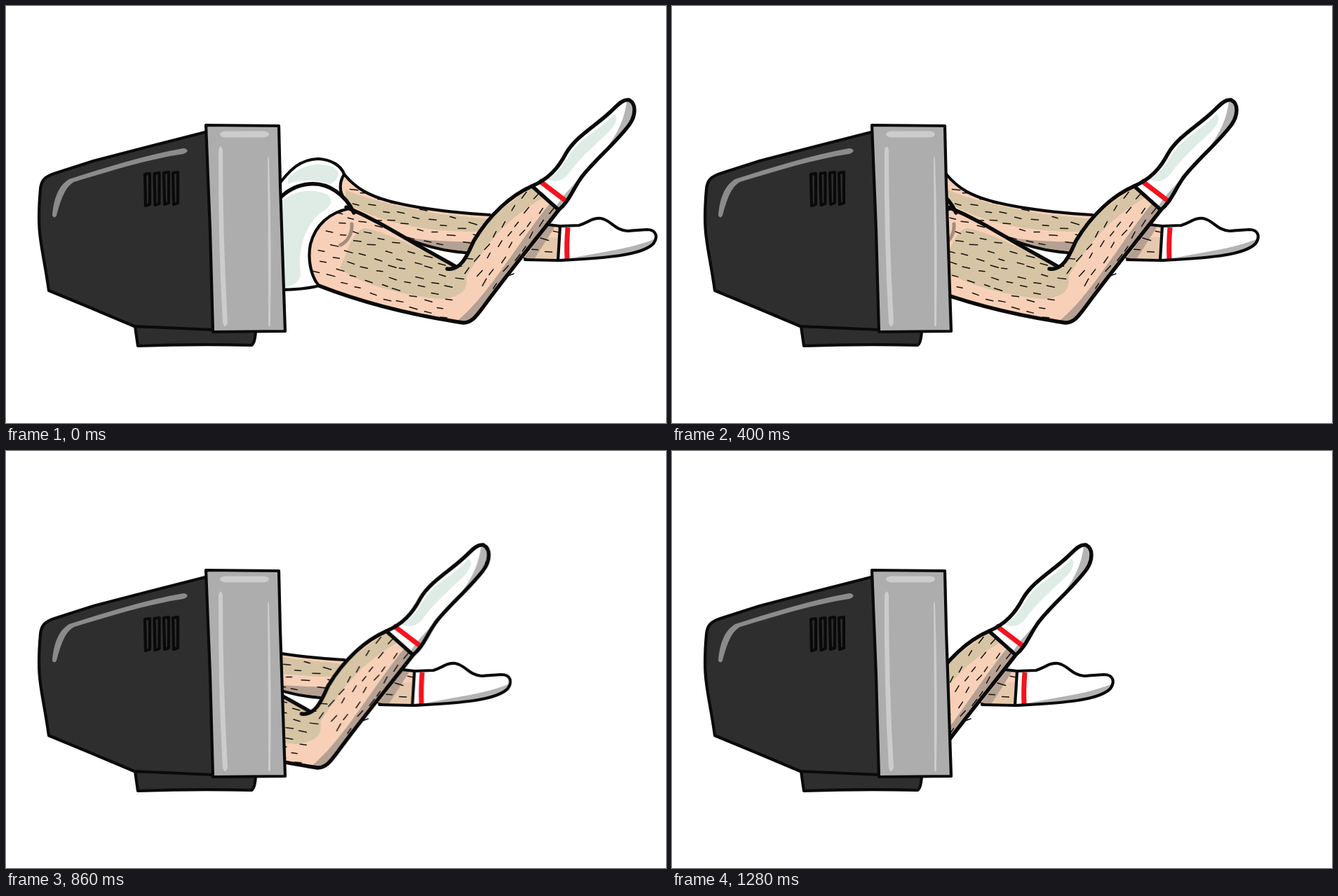
Recreate the animation shown at these times as an HTML page. Size 941x595 px, loop 1.3 s.

```html
<!DOCTYPE html>
<html lang="en">
<head>
<meta charset="utf-8">
<title>Legs and monitor</title>
<style>
html, body { margin: 0; width: 100%; height: 100%; overflow: hidden; background: #fff; }
svg { display: block; width: 100vw; height: 100vh; }
.ink { stroke: #0a0a0a; stroke-width: 4.2; stroke-linecap: round; stroke-linejoin: round; }
.bold { stroke-width: 5.4; }
.line { fill: none; }
.skin { fill: #f8d0b8; }
.tan { fill: #d6c4a4; }
.shade { fill: #b5a193; }
.white { fill: #fff; }
.mint { fill: #dfece6; }
.gray { fill: #b4b4b4; }
.dark { fill: #2e2e2e; }
.red { fill: none; stroke: #f5121d; stroke-width: 7; }
.hair { fill: none; stroke: #15100d; stroke-width: 1.5; stroke-linecap: round; }
#legs { animation: slide 1300ms infinite; }
/* One step every 20 ms. */
@keyframes slide {
  0% { transform: translateX(0); animation-timing-function: steps(20); }
  30.7692% { transform: translateX(-91px); animation-timing-function: steps(7); }
  41.5385% { transform: translateX(-125px); animation-timing-function: steps(10); }
  56.9231% { transform: translateX(-178px); animation-timing-function: steps(17); }
  83.0769% { transform: translateX(-262px); animation-timing-function: steps(10); }
  98.4615%, 100% { transform: translateX(-298px); }
}
</style>
</head>
<body>
<svg viewBox="0 0 941 595" preserveAspectRatio="none">
  <defs>
    <clipPath id="outside"><path d="M388 0H941V595H396Z"/></clipPath>
    <clipPath id="farClip"><path id="far" d="M482 240C500 262 520 271 545 278C590 290 640 295 690 298L790 314L787 363L740 362L700 335L655 352C600 348 560 330 495 293C478 275 474 255 482 240Z"/></clipPath>
    <clipPath id="farSockClip"><path id="farSock" d="M790 314L817 313C830 309 836 302 848 303C864 306 866 319 886 321L914 319C927 319 930 329 923 339C905 358 840 360 787 363Z"/></clipPath>
    <clipPath id="sockClip"><path id="sock" d="M750 257C773 247 787 232 798 211C813 185 843 170 865 148C875 138 881 133 888 134C899 139 898 156 889 169C869 196 839 220 820 245C808 262 802 280 788 291Z"/></clipPath>
    <clipPath id="nearClip"><path id="near" d="M490 289C530 306 560 326 590 343L640 373C653 370 659 352 667 335C690 297 720 270 750 257L788 291C750 340 715 382 680 430C671 442 664 452 652 452C585 442 510 424 446 399C434 385 430 360 434 340C441 312 462 294 490 289Z"/></clipPath>
    <path id="vent" class="dark ink" d="M198 240L205 239L205 283L199 285Z"/>
  </defs>

  <g clip-path="url(#outside)">
    <g id="legs">
      <!-- far leg -->
      <use href="#far" class="skin"/>
      <g clip-path="url(#farClip)">
        <path class="tan" d="M484 262C520 278 570 288 620 297L690 304L676 322C610 322 540 314 484 280Z"/>
        <path class="shade" d="M557 328C590 334 630 337 668 336L655 356C620 351 585 342 557 328Z"/>
        <path class="tan" opacity=".5" d="M740 330H790V364H740Z"/>
        <path class="shade" d="M776 311L784 313L752 363H736Z"/>
        <path class="hair" id="farHair"/>
      </g>
      <path class="ink line" d="M482 240C500 262 520 271 545 278C590 290 640 295 690 298M495 293C560 330 600 348 655 352M773 312L790 314M740 362L787 363"/>
      <use href="#farSock" class="white"/>
      <path class="gray" clip-path="url(#farSockClip)" d="M805 360C845 351 885 348 924 333L930 365H805Z"/>
      <path class="red" d="M801 316Q799 340 800 361"/>
      <use href="#farSock" class="ink line"/>

      <!-- briefs -->
      <path class="white" d="M385 260C405 232 420 219 445 218C464 219 478 228 482 240C475 255 478 270 496 295L385 300Z"/>
      <path class="mint" d="M402 246C418 228 445 221 466 230C480 237 474 249 462 254C445 250 425 245 402 254Z"/>
      <path class="ink line" d="M385 260C405 232 420 219 445 218C464 219 478 228 482 240C475 252 475 265 482 274"/>
      <path class="white" d="M385 280C408 252 444 246 470 264C482 272 490 282 496 295L446 399Q425 405 385 405Z"/>
      <path class="mint" d="M385 284C411 260 440 260 460 270C468 282 460 288 446 297C424 318 416 350 420 382Q418 402 385 403Z"/>

      <!-- near leg -->
      <use href="#near" class="skin"/>
      <g clip-path="url(#nearClip)">
        <path class="tan" d="M476 374C487 352 493 320 512 317C540 322 590 345 640 374C655 365 660 330 682 308L752 257L768 272C710 306 690 335 656 386C660 408 645 416 620 418C570 414 500 396 476 374Z"/>
        <path class="shade" d="M776 281L795 291L690 422L655 458L645 448C690 410 735 330 776 281Z"/>
        <path class="hair" id="nearHair"/>
      </g>
      <path class="line" stroke="#a58d7c" stroke-width="5" stroke-linecap="round" d="M493 311C494 325 487 336 477 341"/>
      <path class="hair" d="M716 385l8 -3"/>
      <path class="ink bold line" d="M385 280C408 252 444 246 470 264C482 272 490 282 496 295"/>
      <path class="ink line" d="M490 289C462 294 441 312 434 340C430 360 434 385 446 399Q425 405 385 405"/>
      <path class="ink bold line" d="M485 287C530 306 560 326 590 343L640 371M629 375C650 378 659 352 667 335C690 297 720 270 750 257M788 291C750 340 715 382 680 430C671 442 664 452 652 452C585 442 510 424 446 399"/>

      <use href="#sock" class="white"/>
      <g clip-path="url(#sockClip)">
        <path class="mint" d="M770 247C790 240 799 217 811 202C827 184 850 174 867 154C874 158 869 169 862 177C838 200 816 219 803 238C794 250 785 253 770 247Z"/>
        <path class="gray" d="M885 135H905L897 172L791 293L784 287C808 245 878 205 885 135Z"/>
      </g>
      <path class="red" d="M760 249L798 278"/>
      <use href="#sock" class="ink bold line"/>
    </g>
  </g>

  <!-- monitor -->
  <g class="ink">
    <path class="dark" d="M184 457L188 485Q270 482 350 484Q355 482 356 463Z"/>
    <path class="dark" d="M288 179Q205 200 125 221L72 238C55 243 50 249 49 262C43 330 52 340 61 406Q122 431 183 457L296 462Z"/>
    <path fill="#adadad" d="M285 170L389 171L391 255L398 464L295 465L291 320Z"/>
  </g>
  <use href="#vent"/>
  <use href="#vent" x="13.5" y="-1"/>
  <use href="#vent" x="27" y="-2"/>
  <use href="#vent" x="40" y="-2"/>
  <path fill="#8b8b8b" d="M66 299C68 276 74 257 90 247C140 231 198 213 253 203C261 204 260 209 253 211C200 219 150 235 97 251C84 258 78 277 72 299Q69 304 66 299Z"/>
  <g fill="#cccccc">
    <rect x="305" y="178.5" width="70" height="9" rx="9" ry="4.5"/>
    <path d="M303 205Q306 196 309 205Q309 330 316 452Q312 462 309 452Q302 330 303 205Z"/>
    <path d="M373 218Q374 212 375 218Q379 340 377 455Q375 460 374 455Q374 340 373 218Z"/>
  </g>
</svg>
<script>
let seed = 7;
const jitter = size => {
  seed = seed * 16807 % 2147483647;
  return (seed / 2147483647 - 0.5) * size;
};

// Staggered rows of short hairs along a limb; the limb's clip trims them.
function hairs(x1, y1, x2, y2, half, tilt) {
  const length = Math.hypot(x2 - x1, y2 - y1);
  const ux = (x2 - x1) / length, uy = (y2 - y1) / length;
  let d = '', odd = 0;
  for (let v = -half; v <= half; v += 15, odd ^= 1) {
    for (let u = odd * 11; u < length; u += 22) {
      const a = u + jitter(8), b = v + jitter(6);
      const angle = Math.atan2(uy, ux) + tilt + jitter(0.3);
      const size = 10 + jitter(4);
      d += `M${x1 + ux * a - uy * b} ${y1 + uy * a + ux * b}l${size * Math.cos(angle)} ${size * Math.sin(angle)}`;
    }
  }
  return d;
}

const grow = (id, d) => document.getElementById(id).setAttribute('d', d);
grow('farHair', hairs(485, 270, 780, 345, 38, -0.1));
grow('nearHair', hairs(450, 335, 640, 405, 45, -0.15) + hairs(676, 398, 764, 285, 28, -0.05));
</script>
</body>
</html>
```
